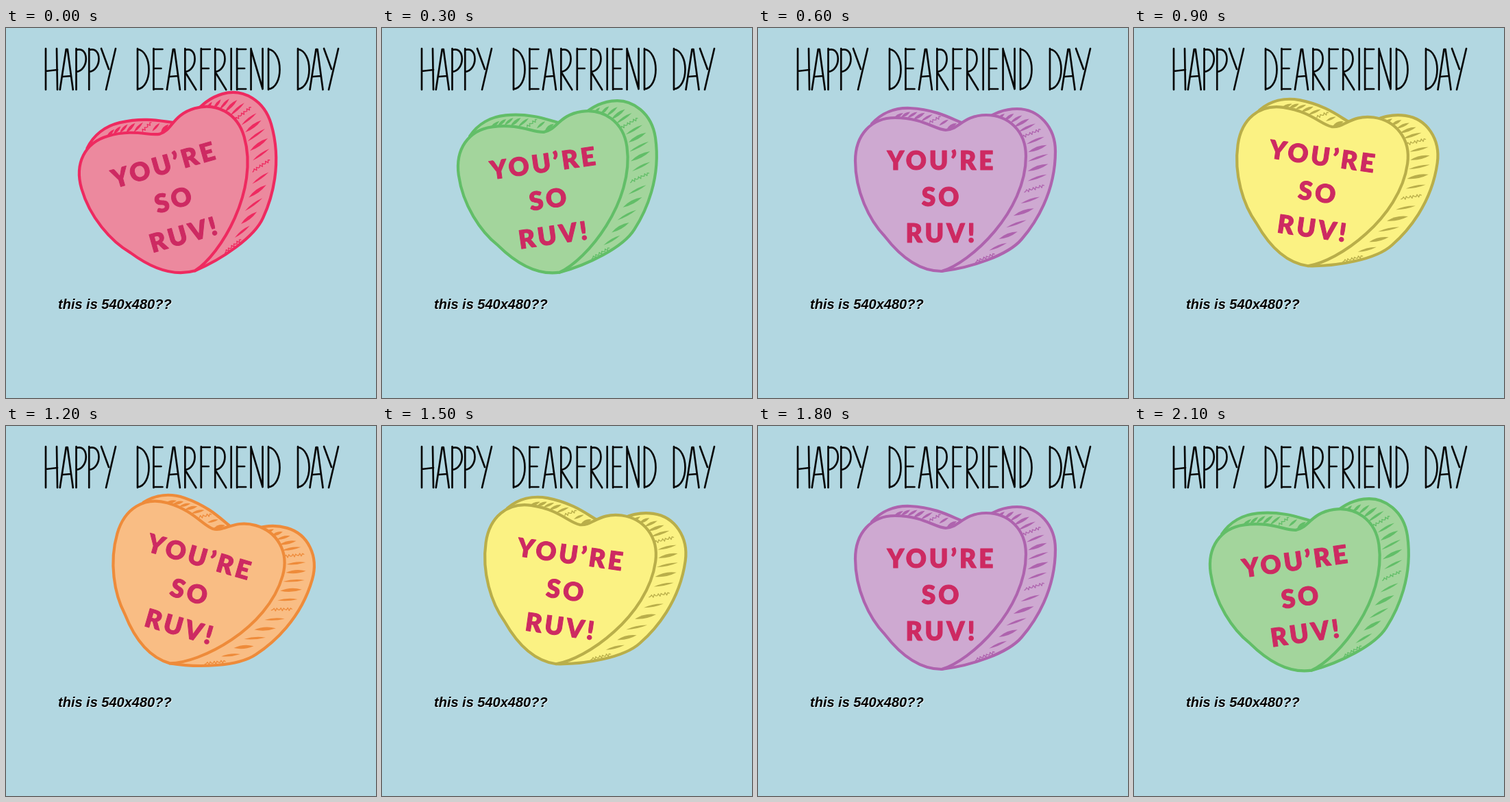
Animation of 540 by 540 pixels, one loop 2.4 s. Source, as an HTML page with a canvas:

```html
<!DOCTYPE html>
<html lang="en">
<head>
<meta charset="utf-8">
<title>Candy heart</title>
<style>
html, body { margin: 0; width: 100%; height: 100%; overflow: hidden; background: #b2d7e1; }
canvas { display: block; width: 100vw; height: 100vh; }
</style>
</head>
<body>
<canvas id="stage" width="540" height="540" role="img" aria-label="Happy Dearfriend Day. You’re so Ruv! this is 540x480??"></canvas>
<script>
const ctx = document.getElementById('stage').getContext('2d');
const STEP = 300;
const TILT = Math.PI / 22.5;

// Each candy leans one TILT further clockwise; x, y is the middle of its lettering
const CANDIES = [
  { x: 244, y: 251, fill: '#ec899e', line: '#ee2a60' },
  { x: 242, y: 250, fill: '#a3d59c', line: '#62be68' },
  { x: 266, y: 247, fill: '#cea9d1', line: '#ae63ae' },
  { x: 267, y: 240, fill: '#fbf283', line: '#b9ae4a' },
  { x: 267, y: 242, fill: '#f9bd84', line: '#ee8b3a' }
];

const FACE = new Path2D('M274 149C258 148 240 131 200 131C165 131 142 156 142 194' +
  'C142 238 162 280 185 304C205 330 232 355 268 355C310 343 391 268 391 187' +
  'C391 150 365 127 333 127C300 127 292 149 274 149Z');
const SIDE = new Path2D('M166 140C180 124 200 116 222 117C262 119 285 134 299 139L317 139' +
  'C330 138 345 118 378 118C410 118 434 145 434 180C434 240 405 285 385 308' +
  'C365 332 310 350 268 355Z');

const STEM = 'M1 0L1 60';
const BOWL = 'M1 2C20 -4 20 32 1 34';
const ARMS = 'M1 1L14 1M1 29L12 29';
const GLYPHS = {
  H: [18, STEM + 'M17 0L18 60M1 33L18 31'],
  A: [19, 'M0 60L9 1L11 1L19 60M4 41L16 40'],
  P: [15, STEM + BOWL],
  R: [17, STEM + BOWL + 'L17 60'],
  F: [14, STEM + ARMS],
  E: [14, STEM + ARMS + 'M1 59L14 59'],
  D: [17, STEM + 'M1 1C23 4 23 57 1 59'],
  N: [19, STEM + 'M1 1L18 59L18 0'],
  Y: [21, 'M0 0L11 30M21 0L7 60'],
  I: [2, STEM]
};

function word(text, left, right) {
  const glyphs = [...text].map(c => GLYPHS[c]);
  const used = glyphs.reduce((sum, g) => sum + g[0], 0);
  const gap = (right - left - used) / (glyphs.length - 1);
  let x = left;
  for (const [width, path] of glyphs) {
    ctx.save();
    ctx.translate(x, 30);
    ctx.stroke(new Path2D(path));
    ctx.restore();
    x += width + gap;
  }
}

function title() {
  ctx.strokeStyle = '#080808';
  ctx.lineWidth = 2.7;
  word('HAPPY', 57, 160);
  word('DEARFRIEND', 191, 399);
  word('DAY', 425, 485);
}

const cubic = (a, b, c, d, t) => {
  const s = 1 - t;
  return s * s * s * a + 3 * s * s * t * b + 3 * s * t * t * c + t * t * t * d;
};

function wedge(n, bulge) {
  ctx.moveTo(0, 0);
  ctx.quadraticCurveTo(-n * 0.5, -bulge, -n, 1);
  ctx.quadraticCurveTo(-n * 0.5, bulge, 0, 0);
  ctx.fill();
}

function scribble(n) {
  ctx.moveTo(0, 0);
  for (let x = 2; x <= n; x += 2) ctx.lineTo(-x, 2.2 * Math.sin(x * 1.9));
  ctx.stroke();
}

// Brush marks running inward from a curve near the candy's outer edge
function hatch(count, xs, ys, length, tilt) {
  for (let i = 0; i < count; i++) {
    const t = i / (count - 1);
    ctx.save();
    ctx.translate(cubic(...xs, t), cubic(...ys, t));
    ctx.rotate(tilt(t) * Math.PI / 180);
    ctx.beginPath();
    if (i % 6 === 5) scribble(length(t));
    else wedge(length(t) + 2 * Math.sin(i * 5), 4.2 + Math.sin(i * 3));
    ctx.restore();
  }
}

function shape(path, candy) {
  ctx.fillStyle = candy.fill;
  ctx.lineWidth = 4.2;
  ctx.fill(path);
  ctx.stroke(path);
}

function shading(candy) {
  ctx.fillStyle = candy.line;
  ctx.lineWidth = 1.3;
  hatch(18, [360, 440, 455, 345], [125, 118, 240, 330],
    t => 17 + 13 * Math.min(1, 3 * t),
    t => -14 - 22 * (1 - t) ** 3 - 8 * t ** 3);
  hatch(8, [212, 235, 262, 290], [124, 119, 126, 139], () => 18, () => -28);
}

function lettering() {
  ctx.fillStyle = ctx.strokeStyle = '#cd2a62';
  ctx.lineWidth = 1;
  ctx.font = '900 37px Lato, "Open Sans", sans-serif';
  ctx.textAlign = 'center';
  ctx.letterSpacing = '4px';
  ['YOU’RE', 'SO', 'RUV!'].forEach((line, i) => {
    const y = -40 + i * 53;
    ctx.fillText(line, 2, y);
    ctx.strokeText(line, 2, y);
  });
}

function heart(index) {
  const candy = CANDIES[index];
  ctx.save();
  ctx.translate(candy.x, candy.y);
  ctx.rotate((index - 2) * TILT);
  ctx.save();
  ctx.translate(-266, -247);
  ctx.strokeStyle = candy.line;
  shape(SIDE, candy);
  shading(candy);
  shape(FACE, candy);
  ctx.restore();
  lettering();
  ctx.restore();
}

function caption() {
  const text = 'this is 540x480??';
  ctx.font = 'italic bold 20px "Liberation Sans", Arial, sans-serif';
  ctx.fillStyle = '#e8f4f7';
  ctx.fillText(text, 77, 411);
  ctx.fillStyle = '#000';
  ctx.fillText(text, 76, 410);
}

function draw(now) {
  // Rock back and forth: 0 1 2 3 4 3 2 1
  const slot = Math.floor(now / STEP) % 8;
  ctx.fillStyle = '#b2d7e1';
  ctx.fillRect(0, 0, 540, 540);
  ctx.lineCap = ctx.lineJoin = 'round';
  heart(4 - Math.abs(4 - slot));
  title();
  caption();
}

function tick() {
  draw(performance.now());
  requestAnimationFrame(tick);
}
tick();
</script>
</body>
</html>
```
